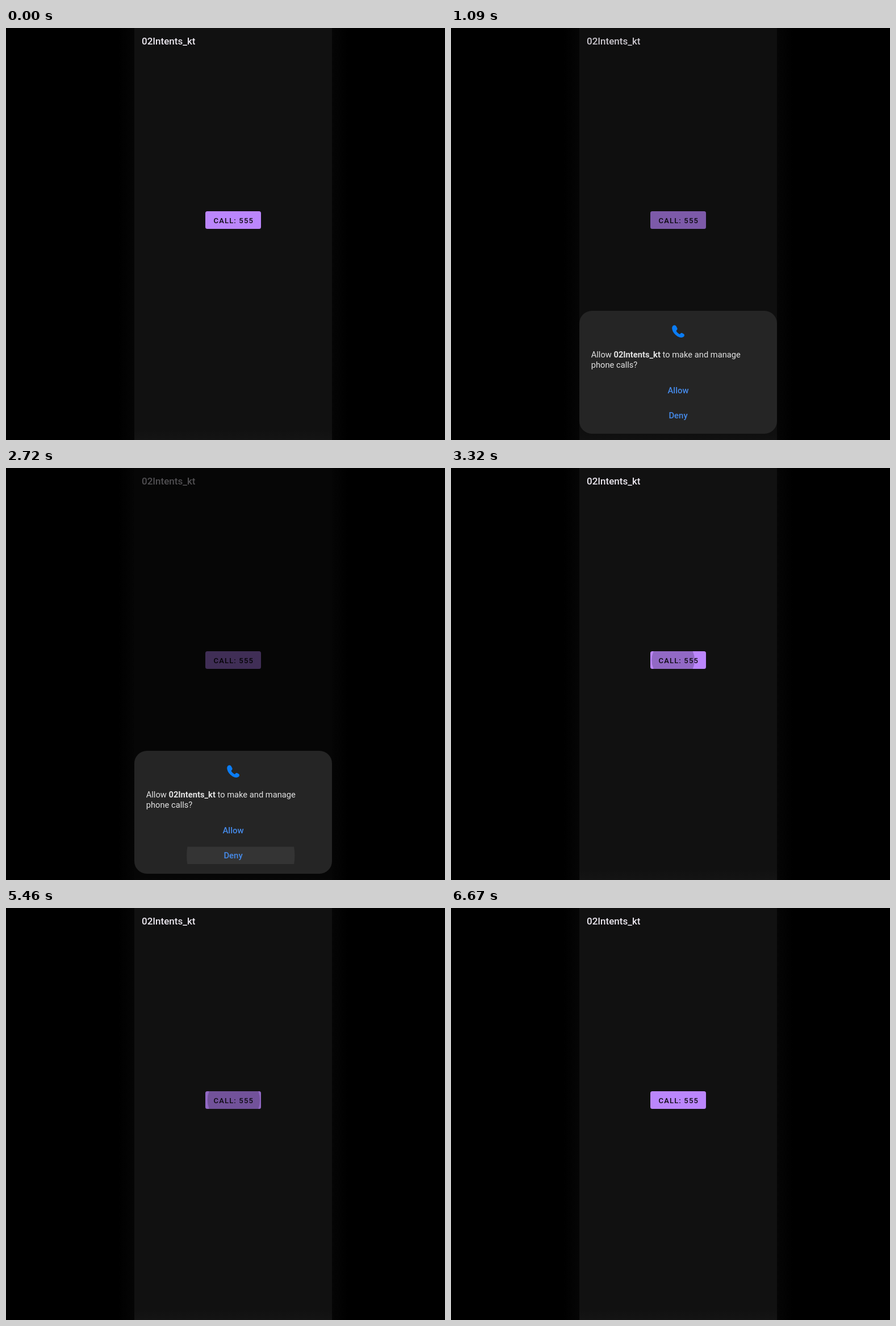
An HTML page with a canvas that plays this animation: 773x724 px, repeating every 6.93 s.

```html
<!DOCTYPE html>
<html lang="en">
<head>
<meta charset="utf-8">
<title>Call intent demo</title>
<style>
  html, body { margin: 0; width: 100%; height: 100%; overflow: hidden; background: #000; }
  canvas { display: block; }
</style>
</head>
<body>
<canvas id="stage" width="773" height="724"></canvas>
<script>
const ctx = document.getElementById('stage').getContext('2d');
const W = 773, H = 724, LOOP = 6930;
const PHONE = { x: 226, w: 348 };
const BUTTON = { x: 351, y: 322, w: 98, h: 31, r: 3.5 };
const SHEET = { x: 226, y: 497, w: 348, h: 216, r: 22 };

// Button presses: shown at `on`, spreading from (x, r), fading over `fade`.
const presses = [
  { on: 480, x: 397, r: 30, fade: [1120, 1400] },
  { on: 3320, x: 391, r: 37.5, fade: [3470, 3730] },
  { on: 4410, x: 396.5, r: 33, fade: [4640, 5000] },
  { on: 5120, x: 398, r: 33, fade: [5460, 5720] },
  { on: 5460, x: 401, r: 46, fade: [5760, 6080] }
];

const clamp = v => Math.max(0, Math.min(1, v));
const ramp = (t, a, b) => clamp((t - a) / (b - a));
const smooth = p => p * p * (3 - 2 * p);
const easeOut = p => 1 - (1 - p) ** 3;
const mix = (a, b, p) => a + (b - a) * p;

function box({ x, y, w, h, r }) {
  ctx.beginPath();
  ctx.roundRect(x, y, w, h, r);
}

function circle(x, y, r, fill) {
  ctx.beginPath();
  ctx.arc(x, y, r, 0, Math.PI * 2);
  ctx.fillStyle = fill;
  ctx.fill();
}

// Returns the x position after the text.
function text(str, x, y, size, weight, fill, align = 'left', spacing = 0) {
  ctx.font = `${weight} ${size}px Roboto, sans-serif`;
  ctx.textAlign = align;
  ctx.letterSpacing = spacing + 'px';
  ctx.fillStyle = fill;
  ctx.fillText(str, x, y);
  return x + ctx.measureText(str).width;
}

function glow(from, to) {
  const g = ctx.createLinearGradient(from, 0, to, 0);
  g.addColorStop(0, '#000');
  g.addColorStop(1, '#050505');
  ctx.fillStyle = g;
  ctx.fillRect(Math.min(from, to), 0, Math.abs(to - from), H);
}

function drawBackground() {
  ctx.fillStyle = '#000';
  ctx.fillRect(0, 0, W, H);
  glow(198, PHONE.x);
  glow(602, PHONE.x + PHONE.w);
  ctx.fillStyle = '#111';
  ctx.fillRect(PHONE.x, 0, PHONE.w, H);
  const g = ctx.createLinearGradient(0, 706, 0, H);
  g.addColorStop(0, '#111');
  g.addColorStop(1, '#141414');
  ctx.fillStyle = g;
  ctx.fillRect(PHONE.x, 706, PHONE.w, H - 706);
}

function drawButton(t) {
  ctx.save();
  box(BUTTON);
  ctx.fillStyle = '#bb86fc';
  ctx.fill();
  ctx.clip();
  for (const p of presses) {
    if (t < p.on || t >= p.fade[1]) continue;
    const grow = easeOut(ramp(t, p.on, p.on + 160));
    const alpha = 0.22 * (1 - ramp(t, ...p.fade));
    circle(mix(p.x, 400, grow), 337.5, mix(p.r, 54, grow), `rgba(0,0,0,${alpha})`);
  }
  ctx.restore();
  text('CALL: 555', 365.5, 342.7, 13, 500, '#0c0a10', 'left', 1.16);
}

function drawHandset() {
  ctx.fillStyle = '#0a7cf5';
  ctx.fill(new Path2D('M392 522.5Q395 521.3 396.5 524L398.6 528Q399 530 396.5 532' +
    'Q398.2 536 403 538.2Q405 535.2 407 536L410 537.8Q412 540 410 542.3' +
    'Q406 546 399 542Q391 537 389.3 529Q388.6 524 392 522.5Z'));
}

function drawSheet(t) {
  const enter = easeOut(ramp(t, 800, 1070));
  const alpha = enter * (1 - smooth(ramp(t, 2760, 2980)));
  if (alpha <= 0) return;
  ctx.save();
  ctx.globalAlpha = alpha;
  ctx.translate(0, 40 * (1 - enter));
  box(SHEET);
  ctx.fillStyle = '#252525';
  ctx.fill();
  drawHandset();

  const ink = '#e2e2e2';
  let x = text('Allow ', 246.7, 579.3, 14.7, 400, ink);
  x = text('02Intents_kt', x, 579.3, 14.7, 700, ink);
  text(' to make and manage', x, 579.3, 14.7, 400, ink);
  text('phone calls?', 246.7, 596.5, 14.7, 400, ink);

  if (t >= 2720) {
    ctx.save();
    ctx.beginPath();
    ctx.roundRect(247, 665.5, 306, 30.5, 4);
    ctx.clip();
    const grow = easeOut(ramp(t, 2720, 2880));
    circle(mix(413.5, 400, grow), 681, mix(94, 156, grow), 'rgba(255,255,255,0.065)');
    ctx.restore();
  }
  text('Allow', 400, 642, 14.9, 500, '#468bea', 'center');
  text('Deny', 400, 686, 14.9, 500, '#468bea', 'center');
  ctx.restore();
}

function draw(t) {
  drawBackground();
  text('02Intents_kt', 239, 29.2, 17, 500, '#ece8f0');
  drawButton(t);
  const dim = 0.66 * smooth(ramp(t, 960, 1400)) * (1 - smooth(ramp(t, 2780, 3080)));
  ctx.fillStyle = `rgba(0,0,0,${dim})`;
  ctx.fillRect(PHONE.x, 0, PHONE.w, H);
  drawSheet(t);
}

const start = performance.now();
function tick() {
  draw((performance.now() - start) % LOOP);
  requestAnimationFrame(tick);
}
tick();
</script>
</body>
</html>
```
